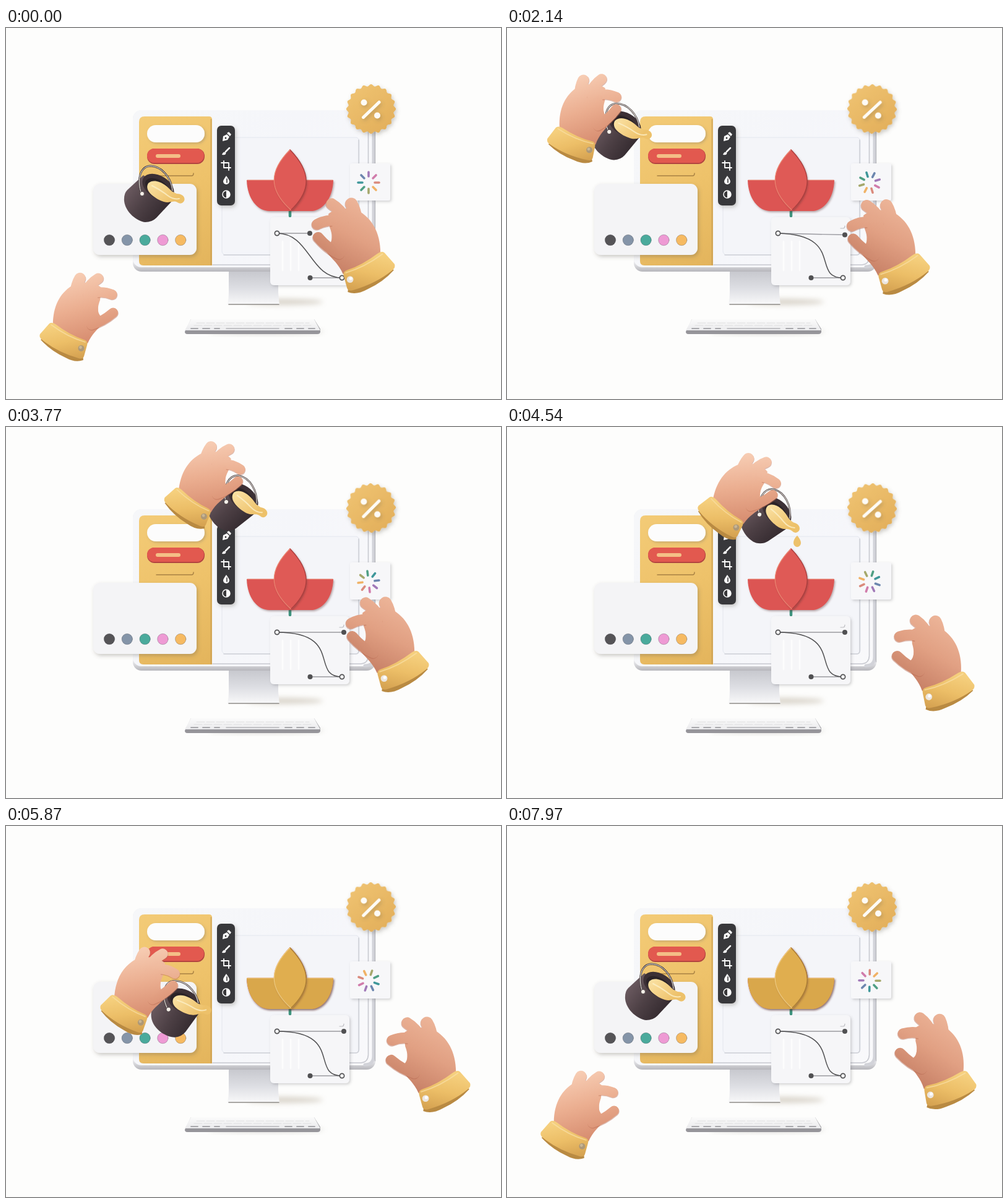
Animation, 800 px wide and 600 px high, one loop 8000 ms. Source, as an HTML page:

```html
<!DOCTYPE html>
<html lang="en">
<head>
<meta charset="utf-8">
<title>Design desk</title>
<style>
html, body { margin: 0; width: 100%; height: 100%; overflow: hidden; background: #fdfdfc; }
svg { display: block; width: 100vw; height: 100vh; }
</style>
</head>
<body>
<svg id="stage" viewBox="0 0 800 600" fill="none" stroke-linecap="round" stroke-linejoin="round"></svg>
<script>
const LOOP = 8000;
const stage = document.getElementById('stage');
const attrs = o => Object.entries(o).map(([k, v]) => `${k}="${v}"`).join(' ');
const rect = (x, y, w, h, r, fill, more = {}) =>
  `<rect ${attrs({ x, y, width: w, height: h, rx: r, fill, ...more })}/>`;
const circle = (cx, cy, r, fill, more = {}) => `<circle ${attrs({ cx, cy, r, fill, ...more })}/>`;
const fill = (d, color, more = {}) => `<path ${attrs({ d, fill: color, ...more })}/>`;
const line = (d, color, width, more = {}) =>
  `<path ${attrs({ d, stroke: color, 'stroke-width': width, ...more })}/>`;
const group = (id, body, more = {}) => `<g ${attrs({ id, ...more })}>${body}</g>`;

const gradient = (id, x1, y1, x2, y2, ...colors) =>
  `<linearGradient id="${id}" gradientUnits="userSpaceOnUse" x1="${x1}" y1="${y1}" x2="${x2}" y2="${y2}">` +
  colors.map((c, i) => `<stop offset="${i / (colors.length - 1)}" stop-color="${c}"/>`).join('') +
  '</linearGradient>';
const shadow = (id, dx, dy, blur, color, opacity) =>
  `<filter id="${id}" x="-20%" y="-20%" width="150%" height="150%">
  <feDropShadow dx="${dx}" dy="${dy}" stdDeviation="${blur}" flood-color="${color}" flood-opacity="${opacity}"/></filter>`;

const defs = `<defs>
${gradient('body', 205, 133, 597, 394, '#f6f7f9', '#f5f6fa', '#f9f9fb')}
${gradient('edge', 0, 378, 0, 395, '#eeeef1', '#b3b3b8')}
${gradient('panel', 215, 143, 333, 384, '#f3cb77', '#eec26a', '#e3b45c')}
${gradient('stand', 0, 392, 0, 447, '#c6c7cd', '#dcdde2', '#f8f8f9')}
${gradient('keys', 0, 472, 0, 490, '#fafafa', '#eaeaec')}
${gradient('skin', 104, 400, 134, 506, '#f7cdb4', '#ebae90', '#d78d70')}
${gradient('tan', 92, 400, 144, 506, '#eeb79b', '#e1a083', '#c67f65')}
${gradient('cuff', 80, 482, 92, 538, '#f5cf7d', '#ecbe67', '#d6a352')}
${gradient('pail', 194, 262, 250, 305, '#6b5a60', '#4d4045', '#352b30')}
${gradient('paint', 235, 245, 270, 280, '#fbe2a4', '#edc16a')}
${gradient('badgeFill', 560, 95, 620, 170, '#efc372', '#e2ae59')}
${shadow('soft', 2, 3, 3, '#5c5648', 0.3)}
${shadow('cardShadow', 2, 2, 2, '#5c5c66', 0.28)}
${shadow('petalShadow', 1.5, 2, 1.5, '#5a3030', 0.4)}
<filter id="blur" x="-50%" y="-100%" width="200%" height="300%"><feGaussianBlur stdDeviation="4"/></filter>
</defs>`;

function monitor() {
  return `<ellipse cx="450" cy="443" rx="62" ry="5" fill="#b5aa98" opacity=".5" filter="url(#blur)"/>` +
    fill('M360 390H440V428Q441 440 442 447H358Q360 438 360 428Z', 'url(#stand)') +
    line('M360 447H441', '#8f8c88', 1.6) +
    rect(205, 133, 392, 261, 14, 'url(#edge)') +
    rect(205, 133, 392, 254, 14, 'url(#body)') +
    line('M594 160V372Q594 386 580 386', '#d2d3d9', 5) +
    line('M585.5 165V370Q585 382 574 383H334', '#c8c9d0', 1.6) +
    line('M596.5 160V380', '#b2b3b9', 1.2) +
    rect(349, 177, 222, 190, 6, '#f4f5f9', { stroke: '#e3e6ee' }) +
    line('M570 181V362Q570 367 565 367H352', '#cfd1d8', 1.6);
}

function sidebar() {
  return fill('M224 143H328Q333 143 333 148V384H222Q215 384 215 377V152Q215 143 224 143Z', 'url(#panel)') +
    line('M331.5 148V383', '#bf9650', 2, { opacity: 0.6 }) +
    rect(228, 157, 93, 28, 14, '#fcfcfc', { filter: 'url(#cardShadow)' }) +
    rect(228, 195, 93, 25, 12, '#b24440') + rect(228, 195, 92, 23, 11.5, '#e2594f') +
    rect(242, 204, 40, 6, 3, '#f4bf86') +
    line('M243 239H300Q303 239 303 235', '#a88143', 1.5);
}

function toolbar() {
  const white = '#fdfdfd', dark = '#39383a';
  return rect(341, 158, 29, 129, 7, dark, { filter: 'url(#soft)' }) +
    fill('M350 183L351 175L357 172L361 176L358 181ZM357 170L360 168L364 172L362 175Z', white) +
    circle(355, 178, 1.4, dark) +
    line('M355 200L361 194', white, 2.5) + fill('M349 205Q351 199 355 201Q357 206 349 205Z', white) +
    line('M352 215V226H363M348 218H360V230', white, 1.8) +
    fill('M356 239Q361 246 361 248A5 5 0 0 1 351 248Q351 246 356 239Z', white) +
    line('M357 244V250', dark, 1.6) +
    circle(356, 269, 6, dark, { stroke: white, 'stroke-width': 1.5 }) +
    fill('M356 263A6 6 0 0 1 356 275Z', white);
}

function lotus(id, side, petal, rim, dark) {
  return group(id,
    fill('M389 246H529C528 276 512 296 492 296H426C406 296 390 276 389 246Z', side, { filter: 'url(#petalShadow)' }) +
    line('M390 246H528', rim, 1.2) +
    fill('M459 196C493 232 494 262 461 295C425 262 424 232 459 196Z', petal, { filter: 'url(#petalShadow)' }) +
    line('M459 197C493 232 494 262 461 294', dark, 1.3) +
    line('M459 197C424 232 425 262 460 294', rim, 1.1));
}

function badge() {
  const teeth = 20;
  let d = '';
  for (let i = 0; i <= 120; i++) {
    const a = i / 120 * 2 * Math.PI, r = 38.5 + 1.8 * Math.cos(a * teeth);
    d += `${i ? 'L' : 'M'}${(590 + r * Math.cos(a)).toFixed(1)} ${(131 + r * Math.sin(a)).toFixed(1)}`;
  }
  return group('badge', `<g filter="url(#soft)">${fill(d + 'Z', 'url(#badgeFill)')}</g>` +
    `<g filter="url(#soft)">${line('M577.5 144.5L603 120', '#fdfbf6', 5)}` +
    circle(578.5, 120.5, 5, '#fdfbf6') + circle(600, 141.5, 5, '#fdfbf6') + '</g>');
}

function spinnerCard() {
  const colors = ['#f0b266', '#a5a86c', '#4f9f84', '#3f979a', '#6c86ae', '#a179b8', '#d17cab', '#da8a7c'];
  const spokes = colors.map((c, i) =>
    line('M586 240V233', c, 3.6, { transform: `rotate(${i * 45} 586 250)` })).join('');
  return rect(556, 219, 65, 60, 3, '#f7f7f9', { filter: 'url(#cardShadow)' }) + group('spinner', spokes);
}

function paletteCard() {
  return rect(141, 252, 167, 115, 11, '#f4f4f6', { filter: 'url(#soft)' }) +
    ['#555457', '#8494a8', '#4aaa9c', '#ee9ad4', '#f6ba62'].map((c, i) =>
      circle(167 + i * 28.8, 343, 8.7, c, { stroke: '#404048', 'stroke-opacity': 0.3 })).join('');
}

function curveCard() {
  const ink = '#505052', pale = '#9a9aa0';
  return rect(427, 306, 128, 110, 6, '#f6f6f8', { filter: 'url(#cardShadow)' }) +
    line('M447 345V392M460 345V392M473 345V392', '#fdfdfd', 2.5) +
    line('M539 324H543Q546 324 546 320', '#b9b9be', 1.2) +
    line('M543 404H491', pale, 1.4) +
    line('', pale, 1.4, { id: 'lever' }) + line('', ink, 1.5, { id: 'curve' }) +
    circle(491.5, 404, 4, ink) + circle(546, 332, 4, ink, { id: 'knob' }) +
    [[438, 332], [543, 404]].map(([x, y]) =>
      circle(x, y, 3.6, '#fdfdfd', { stroke: ink, 'stroke-width': 1.7 })).join('');
}

function keyboard() {
  return `<ellipse cx="420" cy="491" rx="94" ry="3" fill="#96918a" opacity=".5" filter="url(#blur)"/>` +
    fill('M299 471H498L508 487V491Q508 495 503 495H293Q289 495 289 491Z', '#96959a') +
    fill('M299 471H498L508 489H289Z', 'url(#keys)') +
    line('M299 486H345M451 486H499', '#a9a9ad', 1.8, { 'stroke-dasharray': '11 8' }) +
    line('M356 486H441', '#b5b5b9', 1.6) +
    line('M308 477H490M304 481H494', '#dededf', 1, { 'stroke-dasharray': '13 3' });
}

function bucket() {
  const handle = 'M219 268C210 244 218 223 234 223C252 224 267 242 269 263';
  return fill('M222 238L196 262Q190 268 191 280C193 298 212 313 225 314Q236 314 243 307L271 277Z', 'url(#pail)') +
    `<g transform="rotate(32 246 257)"><ellipse cx="246" cy="257" rx="28" ry="18" fill="#3c3035"/>
     <ellipse cx="246" cy="259" rx="22" ry="13" fill="#2b2327"/></g>` +
    fill('M230 251C240 242 256 252 263 259Q268 265 276 268C287 268 291 276 287 281Q283 286 277 282C270 278 266 284 255 281C243 277 222 264 230 251Z', 'url(#paint)') +
    line('M236 255Q250 262 260 270T280 276', '#fdf0c8', 2, { opacity: 0.8 }) +
    line(handle, '#4c4345', 2.8) + line(handle, '#f4efe8', 1) +
    circle(220, 268, 3.6, '#f6f1ea', { stroke: '#51474a', 'stroke-width': 1 });
}

function hand(id, tone) {
  const skin = `url(#${tone})`, crease = '#b4674f';
  const finger = (d, width) =>
    line(d, crease, width, { opacity: 0.45, transform: 'translate(.5 1)' }) + line(d, skin, width - 0.5);
  return group(id,
    finger('M112 430Q114 414 119.5 405', 19) + finger('M126 430Q137 412 149 405', 17.5) +
    fill('M76 484C75 452 86 430 106 417C122 408 146 412 154 420L152 440Q145 458 153 466L156 478C148 488 139 494 132 510Z', skin) +
    group(id + 'Index', finger('M132 432Q152 423 171.5 431', 16.5)) +
    group(id + 'Thumb', finger('M138 480Q156 475 173 460.5', 16.5)) +
    fill('M112 440Q130 428 148 432L149 462Q140 476 128 484Q110 470 112 440Z', skin) +
    fill('M59 502L124 529L125 537Q112 542 96 533Q72 522 56 504Z', '#b98a42') +
    fill('M70 478Q74 475 80 479Q104 497 126 504Q133 506 131 513L126 531Q124 536 117 534Q82 524 58 504Q53 500 55 495Z', 'url(#cuff)') +
    line('M73 480Q100 500 128 508', '#fae2a8', 1.6, { opacity: 0.7 }) +
    circle(121.5, 518, 5, tone === 'tan' ? '#ece6e0' : '#ad9878') +
    circle(120.5, 516.5, 2.4, tone === 'tan' ? '#fdfdfd' : '#c9b694'));
}

stage.innerHTML = defs + rect(0, 0, 800, 600, 0, '#fdfdfc') + monitor() + sidebar() + toolbar() +
  line('M459 292V304', '#3f957f', 4.5) +
  lotus('red', '#dc5553', '#df5a57', '#ec8a74', '#a83d3d') +
  lotus('gold', '#d9a74b', '#e0ae50', '#efcd85', '#a97c34') +
  keyboard() + badge() + spinnerCard() + paletteCard() + curveCard() +
  group('drop', fill('M469 177Q475 184 475 189A6 6.5 0 0 1 463 189Q463 183 469 177Z', 'url(#paint)')) +
  group('pot', bucket()) + hand('left', 'skin') + hand('right', 'tan');

// time, dx, dy, turn
const leftSteps = [
  [0, 0, 0, 0], [400, -6, 3, -1], [700, -8, 1, -2], [850, -17, -22, -5], [980, -21, -110, -8],
  [1130, 5, -198, -7], [1350, 50, -223, -2], [1500, 64, -223, 0], [1620, 64, -223, 0],
  [2100, 10, -310, -4], [2500, 28, -357, -3], [2800, 34, -365, -2], [3040, 37, -361, -2],
  [3340, 72, -365, 1], [4000, 244, -386, 9], [4540, 254, -368, 11],
  [5040, 232, -388, 10], [5870, 98, -205, 4], [6300, 64, -223, 0],
  [6670, 30, -235, 4], [7470, -4, -8, 1], [7700, -5, 0, 0], [8000, 0, 0, 0]];
const rightSteps = [
  [0, 0, 0, 0], [780, 1, 0, 0], [1130, 45, -7, 0], [1400, 55, -2, 0], [3040, 55, 5, 0],
  [3500, 55, 0, 0], [3950, 55, 0, 0], [4170, 66, 8, 1], [4540, 127, 35, 4], [5000, 126, 40, 3],
  [5870, 122, 34, 0], [6350, 126, 73, 3], [6670, 127, 70, 4], [8000, 130, 36, 6]];
const tiltSteps = [[0, 0], [1620, 0], [3040, 2], [4540, 2], [5870, -11], [6300, 0], [8000, 0]];
const leftGrip = [[0, 0], [1350, 0], [1500, 1], [6300, 1], [6450, 0], [8000, 0]];
const rightGrip = [[0, 1], [3920, 1], [4120, 0], [8000, 0]];
const goldFade = [[0, 0], [4650, 0], [5050, 1], [8000, 1]];

// Monotone cubic interpolation: smooth, without overshoot.
function sample(steps, t, col = 1) {
  let i = 0;
  while (i < steps.length - 2 && t >= steps[i + 1][0]) i++;
  const slope = k => k < 0 || k > steps.length - 2 ? 0
    : (steps[k + 1][col] - steps[k][col]) / (steps[k + 1][0] - steps[k][0]);
  const tangent = k => {
    const a = slope(k - 1), b = slope(k);
    return a * b > 0 ? 2 * a * b / (a + b) : 0;
  };
  const [p, q] = [steps[i], steps[i + 1]];
  const span = q[0] - p[0], u = (t - p[0]) / span, v = 1 - u;
  return p[col] * (1 + 2 * u) * v * v + q[col] * u * u * (3 - 2 * u) +
    span * u * v * (tangent(i) * v - tangent(i + 1) * u);
}

const set = (id, name, value) => document.getElementById(id).setAttribute(name, value);
const place = (id, value) => set(id, 'transform', value);

function pinch(id, grip) {
  place(id + 'Index', `rotate(${6 * grip} 128 428)`);
  place(id + 'Thumb', `rotate(${-9 * grip} 136 482)`);
}

function draw(t) {
  const [lx, ly, lr] = [1, 2, 3].map(c => sample(leftSteps, t, c));
  const [rx, ry, rr] = [1, 2, 3].map(c => sample(rightSteps, t, c));
  const leftPose = `translate(${54 + lx} ${498 + ly}) rotate(${lr})`;
  place('left', `${leftPose} translate(-54 -498)`);
  place('right', `translate(${629 + rx} ${385 + ry}) rotate(${rr}) scale(-1.08 1.08) translate(-54 -498)`);
  pinch('left', sample(leftGrip, t));
  pinch('right', sample(rightGrip, t));

  const held = t > 1600 && t < 6300;
  place('pot', held ? `${leftPose} translate(-118 -275) rotate(${sample(tiltSteps, t)} 240 224)` : '');

  const dragging = t < 3950;
  const x = dragging ? 491 + rx : 546, y = dragging ? 332 + ry : 332;
  set('lever', 'd', `M438 332L${x} ${y}`);
  set('curve', 'd', `M438 332C${x} ${y} 491 404 543 404`);
  set('knob', 'cx', x);
  set('knob', 'cy', y);

  const pouring = t > 4380 && t < 4980, fall = (t - 4380) % 300 / 300;
  set('drop', 'opacity', pouring ? 1 : 0);
  place('drop', `translate(0 ${-16 + 50 * fall * fall})`);
  set('gold', 'opacity', sample(goldFade, t));

  place('spinner', `rotate(${135 + t * 0.034} 586 250)`);
  place('badge', `rotate(${2 * Math.sin(t * Math.PI / 1000)} 590 131)`);
}

const start = performance.now();
function tick() {
  draw((performance.now() - start) % LOOP);
  requestAnimationFrame(tick);
}
tick();
</script>
</body>
</html>
```
